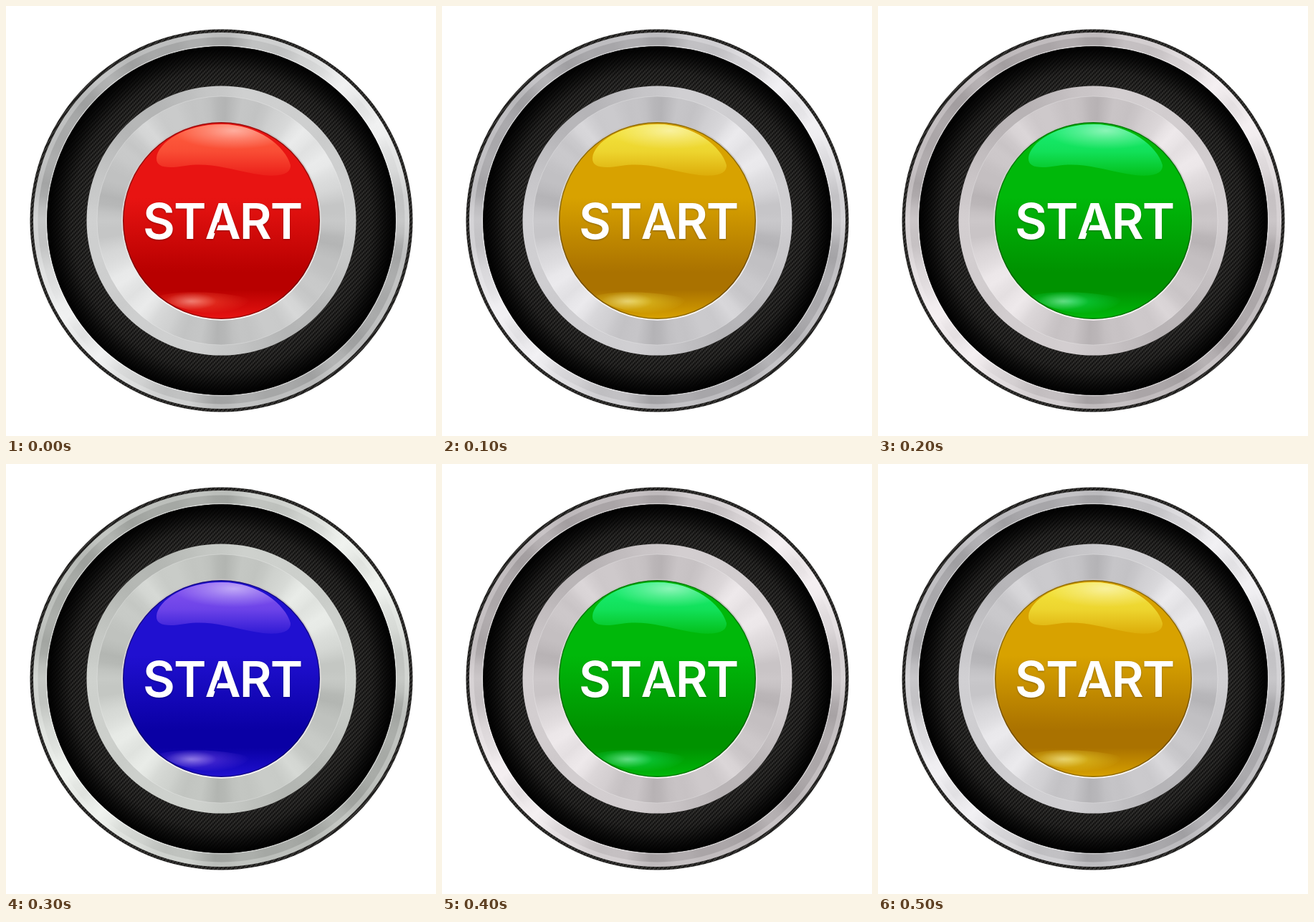
Recreate the animation shown at these times as an HTML page with a canvas. Size 600 by 600 pixels, loop 0.6 s.

```html
<!DOCTYPE html>
<html lang="en">
<head>
<meta charset="utf-8">
<title>Start button</title>
<style>
html, body { margin: 0; width: 100%; height: 100%; overflow: hidden; background: #fff; }
canvas { display: block; width: 600px; height: 600px; }
</style>
</head>
<body>
<canvas id="stage" width="600" height="600" role="img" aria-label="START"></canvas>
<script>
const SIZE = 600, CX = 300.5, CY = 299.5, TAU = Math.PI * 2;
const STEP = 100;
const ORDER = ['red', 'yellow', 'green', 'blue', 'green', 'yellow'];

const THEMES = {
  red: { mid: '#e81412', dark: '#b80000', gloss: '255,96,64', tint: [0, 1, 1] },
  yellow: { mid: '#d8a200', dark: '#aa7200', gloss: '244,230,62', tint: [1, 0, 3] },
  green: { mid: '#00b80a', dark: '#009200', gloss: '24,238,116', tint: [4, -1, 1] },
  blue: { mid: '#2010d0', dark: '#0a00a4', gloss: '134,84,240', tint: [-1, 2, -2] }
};

function makeLayer(size = SIZE) {
  const c = document.createElement('canvas');
  c.width = c.height = size;
  return c;
}

function disc(g, r, fill) {
  g.beginPath();
  g.arc(CX, CY, r, 0, TAU);
  g.fillStyle = fill;
  g.fill();
}

function ring(g, r, width, stroke) {
  g.beginPath();
  g.arc(CX, CY, r, 0, TAU);
  g.lineWidth = width;
  g.strokeStyle = stroke;
  g.stroke();
}

// Brushed metal: broad shine on one diagonal, weaker on the other, plus fine streaks
function metal(g, tint, base, broad, cross, streak) {
  const grad = g.createConicGradient(0, CX, CY), steps = 90, peak = TAU * 0.895;
  for (let i = 0; i <= steps; i++) {
    const a = i / steps * TAU;
    const level = base + broad * Math.cos(2 * (a - peak)) + cross * Math.cos(4 * (a - peak)) +
      streak * (Math.cos(14 * a) + Math.sin(22 * a + 1));
    grad.addColorStop(i / steps, `rgb(${tint.map(t => Math.round(level + t)).join()})`);
  }
  return grad;
}

function glow(g, x, y, rx, ry, rgb, alpha) {
  g.save();
  g.translate(x, y);
  g.scale(rx, ry);
  const grad = g.createRadialGradient(0, 0, 0, 0, 0, 1);
  grad.addColorStop(0, `rgba(${rgb},${alpha})`);
  grad.addColorStop(0.45, `rgba(${rgb},${alpha * 0.5})`);
  grad.addColorStop(1, `rgba(${rgb},0)`);
  g.fillStyle = grad;
  g.fillRect(-1, -1, 2, 2);
  g.restore();
}

// Diagonal twill of short upright threads
function weave(g) {
  const n = 6, tile = makeLayer(n), t = tile.getContext('2d');
  t.fillStyle = '#1c1b1a';
  t.fillRect(0, 0, n, n);
  t.fillStyle = '#383735';
  for (let x = 0; x < n; x += 2) {
    for (const y of [n - x, -x]) t.fillRect(x, y, 2, 3);
  }
  return g.createPattern(tile, 'repeat');
}

function drawCarbon(g) {
  disc(g, 243.3, weave(g));
  const shade = g.createRadialGradient(CX, CY, 188, CX, CY, 243);
  shade.addColorStop(0, 'rgba(0,0,0,.15)');
  shade.addColorStop(0.4, 'rgba(0,0,0,.3)');
  shade.addColorStop(0.75, 'rgba(0,0,0,.75)');
  shade.addColorStop(1, '#000');
  disc(g, 243.3, shade);
}

function drawRings(g, tint) {
  disc(g, 267, weave(g));
  disc(g, 262.5, metal(g, tint, 206, 24, 8, 4));
  disc(g, 256, metal(g, tint, 190, 34, 12, 6));
  ring(g, 244, 1.4, 'rgba(255,255,255,.5)');
  drawCarbon(g);
  disc(g, 188, metal(g, tint, 198, 12, -6, 1));
  disc(g, 173.5, metal(g, tint, 204, 12, 16, 4));
  ring(g, 173.5, 1, 'rgba(255,255,255,.25)');
  const lip = g.createLinearGradient(0, 160, 0, 440);
  lip.addColorStop(0, '#c4c0c0');
  lip.addColorStop(1, '#fbf8f7');
  disc(g, 139.3, lip);
}

function drawGloss(g, rgb) {
  const grad = g.createLinearGradient(0, 166, 0, 240);
  grad.addColorStop(0, `rgb(${rgb})`);
  grad.addColorStop(0.5, `rgba(${rgb},.75)`);
  grad.addColorStop(1, `rgba(${rgb},.1)`);
  g.save();
  g.beginPath();
  g.moveTo(210, 212);
  g.bezierCurveTo(212, 190, 250, 165, 301, 165);
  g.bezierCurveTo(352, 165, 390, 196, 397, 222);
  g.bezierCurveTo(398, 238, 372, 239, 346, 234);
  g.bezierCurveTo(306, 226, 282, 218, 250, 223);
  g.bezierCurveTo(226, 227, 209, 226, 210, 212);
  g.fillStyle = grad;
  g.fill();
  g.clip();
  glow(g, 318, 174, 85, 26, '255,255,255', 0.5);
  g.restore();
}

function drawLowShine(g, rgb) {
  g.save();
  g.beginPath();
  g.moveTo(215, 404);
  g.bezierCurveTo(240, 396, 310, 398, 341, 409);
  g.bezierCurveTo(330, 425, 300, 431, 276, 428);
  g.bezierCurveTo(248, 425, 222, 414, 215, 404);
  g.clip();
  glow(g, 268, 412, 72, 18, rgb, 0.6);
  glow(g, 258, 412, 36, 12, '255,255,255', 0.35);
  g.restore();
}

function drawButton(g, theme) {
  const grad = g.createLinearGradient(0, 163, 0, 437);
  grad.addColorStop(0, theme.mid);
  grad.addColorStop(0.38, theme.mid);
  grad.addColorStop(0.76, theme.dark);
  grad.addColorStop(0.85, theme.dark);
  grad.addColorStop(1.3 / 1.3, theme.mid);
  disc(g, 137.5, grad);
  drawGloss(g, theme.gloss);
  drawLowShine(g, theme.gloss);
  ring(g, 136.8, 1.4, 'rgba(0,0,0,.35)');
}

function makeLabel() {
  const layer = makeLayer(), g = layer.getContext('2d');
  g.font = '600 69px Inter, "Open Sans", sans-serif';
  g.fontKerning = 'none';
  g.letterSpacing = '-2px';
  g.fillStyle = '#fff';
  g.fillText('START', 191, 325);
  // Stencil gap in the A
  g.globalCompositeOperation = 'destination-out';
  g.lineWidth = 2.2;
  g.beginPath();
  g.moveTo(291, 317);
  g.lineTo(296.5, 302);
  g.stroke();
  return layer;
}

const label = makeLabel();

function makeFace(theme) {
  const layer = makeLayer(), g = layer.getContext('2d');
  g.fillStyle = '#fff';
  g.fillRect(0, 0, SIZE, SIZE);
  drawRings(g, theme.tint);
  drawButton(g, theme);
  g.shadowColor = 'rgba(0,0,0,.3)';
  g.shadowBlur = 2;
  g.shadowOffsetY = 1;
  g.drawImage(label, 0, 0);
  return layer;
}

const faces = {};
for (const name in THEMES) faces[name] = makeFace(THEMES[name]);

const ctx = document.getElementById('stage').getContext('2d');
const start = performance.now();

function frame() {
  const t = Math.max(0, performance.now() - start);
  ctx.drawImage(faces[ORDER[Math.floor(t / STEP) % ORDER.length]], 0, 0);
  requestAnimationFrame(frame);
}
frame();
</script>
</body>
</html>
```
